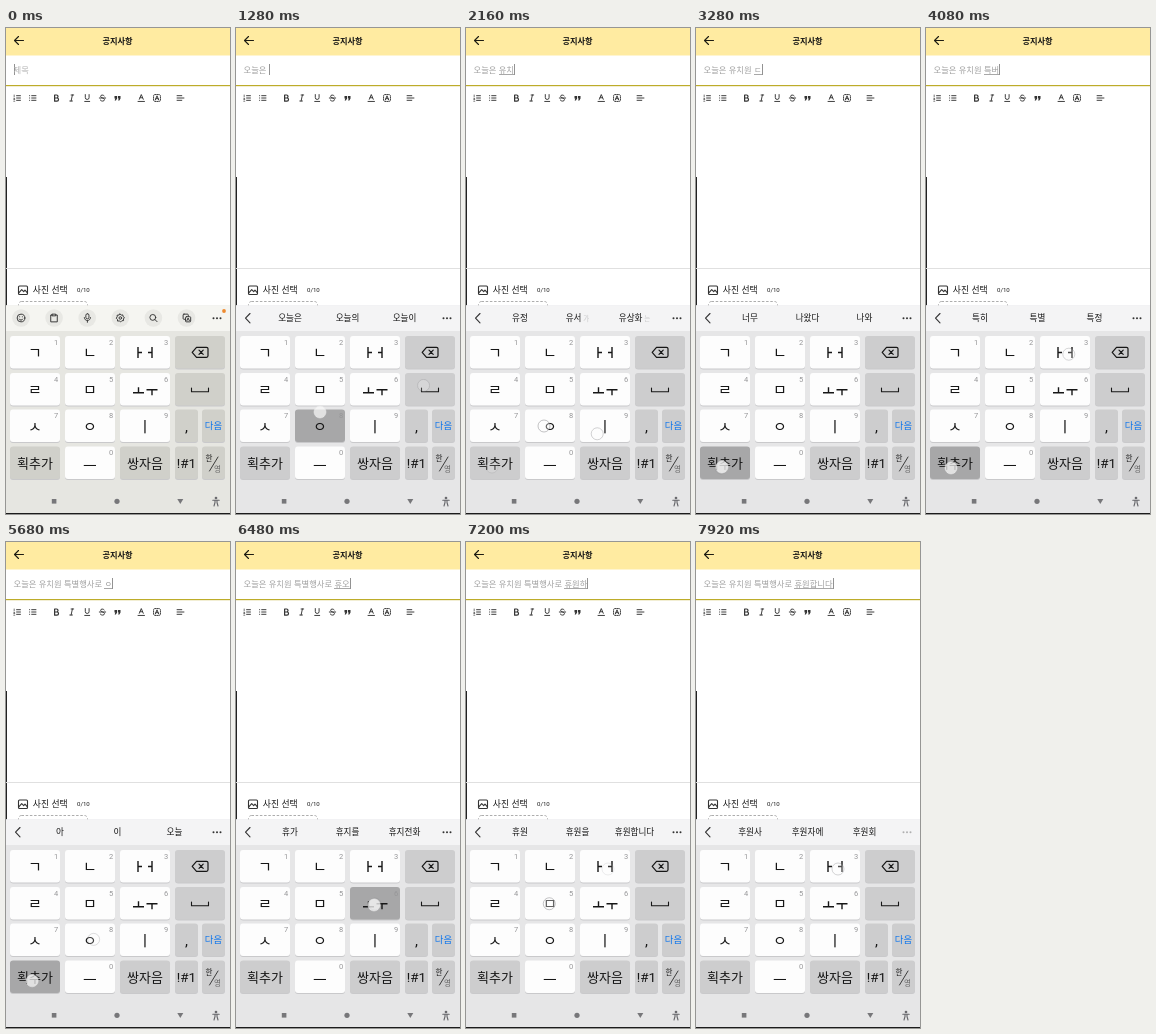
Recreate the animation shown at these times as an HTML page. Size 224 px wide and 486 px high, loop 8000 ms.

```html
<!DOCTYPE html>
<html lang="ko">
<head>
<meta charset="utf-8">
<title>공지사항</title>
<style>
html, body { margin: 0; width: 100%; height: 100%; overflow: hidden; background: #fff; }
body { position: relative; font-family: "Noto Sans CJK KR", "Noto Sans CJK", sans-serif; }
svg { position: absolute; left: 0; top: 0; width: 224px; height: 486px; display: block; --board: #e6e6e7; --gray: #cdcdce; --top: #f4f4f5; }
svg.idle { --board: #e6e6e1; --gray: #d0d0ca; --top: #f5f5f1; }
text { fill: #161616; }
.mid { text-anchor: middle; }
.line { fill: none; stroke: #333; stroke-width: 1.1; stroke-linecap: round; stroke-linejoin: round; }
.icons > * { transform-box: fill-box; transform-origin: center; transform: scale(.86); }
.board { fill: var(--board); }
.top { fill: var(--top); }
.key { fill: #fdfdfd; }
.key.gray { fill: var(--gray); }
.key.down { fill: #a7a7a8; }
.num { fill: #969698; font-family: Roboto, sans-serif; font-size: 7.5px; }
.latin { font-family: Roboto, sans-serif; }
.sug { font-size: 8.6px; font-weight: 500; }
.tail { fill: #c6c6c8; font-size: 6.5px; }
#field { position: absolute; left: 7.5px; top: 34.4px; height: 14px; font-size: 8.3px; line-height: 14px; white-space: pre; color: #a0a0a0; }
#word { display: inline-block; height: 12px; line-height: 14px; vertical-align: top; }
#word.on { border-bottom: 1px solid #a8a8a8; }
#caret { display: inline-block; width: 1px; height: 11px; margin: 2px -1px 0 0; vertical-align: top; background: #929292; }
#hint { color: #b4b4b4; }
</style>
</head>
<body>
<svg id="stage" viewBox="0 0 224 486">
  <rect width="224" height="27.5" fill="#ffeba1"/>
  <path class="line" d="M17.500 12.500H8.500M12.500 8.500l-4 4 4 4" style="stroke:#1c1a12"/>
  <text class="mid" x="111.500" y="15.500" font-size="8.2" font-weight="700">공지사항</text>
  <rect y="57" width="224" height="1.2" fill="#bdac2a"/>

  <g class="line icons">
    <g>
      <path d="M10.5 67.3H15M10.5 70H15M10.5 72.7H15"/>
      <path d="M7.7 66.5v2M7.2 70.3h1.2l-1.2 1.5h1.2M7.2 73.7h1.2" stroke-width=".8"/>
    </g>
    <path d="M23 67.3h.2M23 70h.2M23 72.7h.2M25.5 67.3h5M25.5 70h5M25.5 72.7h5"/>
    <path d="M48.3 66.5h2.2a1.7 1.7 0 0 1 0 3.5h-2.2zM48.3 70h2.7a1.8 1.8 0 0 1 0 3.7h-2.7z" style="stroke-width:1.4"/>
    <path d="M65 66.5h3M63.5 73.5h3M66.5 66.5l-1.5 7"/>
    <path d="M79 66v3.5a2.2 2.2 0 0 0 4.4 0V66M78.3 74h5.8"/>
    <path d="M98.5 67.5c-1-1.5-4.2-1.3-4.2.5 0 2.3 4.5 1.5 4.5 3.9 0 2.2-3.8 2.3-4.9.5M92.8 70h7.4"/>
    <path d="M108 67.5h3v3l-1.3 2.5h-1.5l.8-2.5h-1zM112 67.5h3v3l-1.3 2.5h-1.5l.8-2.5h-1z" style="fill:#333;stroke:none"/>
    <path d="M133 71.5l2.3-5.5 2.3 5.5M133.8 69.7h3M131.5 74h7.5"/>
    <g>
      <path d="M149 72.3l2-4.8 2 4.8M149.8 70.8h2.5"/>
      <rect x="147" y="66" width="8" height="8" rx="1.5" stroke-dasharray="1 1.2"/>
    </g>
    <path d="M170.5 67.3h5.5M170.5 70h8M170.5 72.7h5.5"/>
  </g>

  <rect y="149" width="1" height="128.5" fill="#222"/>
  <rect y="240" width="224" height="1" fill="#e0e0e0"/>
  <g class="line">
    <rect x="12.5" y="258" width="9" height="8.5" rx="1"/>
    <path d="M13 264.7l2.7-3 2 2 1.3-1.5 2.2 2.5"/>
    <rect x="12.5" y="273.5" width="69" height="40" rx="3" style="stroke:#999;stroke-width:.8;stroke-dasharray:2.5 1.7;stroke-linecap:butt"/>
  </g>
  <text x="26.8" y="265" font-size="8.8" font-weight="500">사진 선택</text>
  <text class="latin" x="71" y="264.3" font-size="6.1">0/10</text>

  <rect class="board" y="277.5" width="224" height="208.5"/>
  <rect class="top" y="277.5" width="224" height="25.5"/>

  <g id="tools">
    <g fill="#e8e8e4" id="discs"></g>
    <g class="line icons">
      <g>
        <circle cx="15" cy="290" r="4.5"/>
        <path d="M13 291.3c.7 1.7 3.3 1.7 4 0M13.4 288.6h.1M16.5 288.6h.1"/>
      </g>
      <path d="M46 286.5h-1.8v8h7.6v-8H50M46 285.5h4v2h-4z"/>
      <g>
        <rect x="79.6" y="285" width="3.6" height="6" rx="1.8"/>
        <path d="M77.8 289.5c0 4.7 7.2 4.7 7.2 0M81.4 293v2"/>
      </g>
      <g>
        <path d="M114 285.3l1.3 1.3 1.9-.2.3 1.9 1.6 1.2-1.2 1.6.2 1.9-2 .2-1.4 1.4-1.6-1.2-2 .2-.1-2-1.5-1.4 1.2-1.5-.1-1.9 1.9-.2z"/>
        <circle cx="114.3" cy="290" r="1.5"/>
      </g>
      <g>
        <circle cx="146.7" cy="289.3" r="3.4"/>
        <path d="M149.2 291.8l2.5 2.5"/>
      </g>
      <g>
        <rect x="176.5" y="285.5" width="6" height="6" rx="1"/>
        <rect x="179.3" y="288.5" width="6" height="6" rx="1" fill="#e8e8e4"/>
        <path d="M180.8 293.2l1.5-3.2 1.5 3.2"/>
      </g>
    </g>
    <circle cx="218" cy="283" r="1.9" fill="#ee8a2f"/>
  </g>
  <g id="bar">
    <path class="line" d="M14 285.5l-4.5 4.7 4.5 4.7"/>
    <text class="sug mid" x="54" y="293.3"></text>
    <text class="sug mid" x="111.5" y="293.3"></text>
    <text class="sug mid" x="168.5" y="293.3"></text>
  </g>
  <g id="dots" fill="#333">
    <circle cx="207.5" cy="290.3" r="1"/><circle cx="211" cy="290.3" r="1"/><circle cx="214.5" cy="290.3" r="1"/>
  </g>

  <g id="keys"></g>

  <g class="line" style="stroke:#161616">
    <path d="M132 319v11M132 324.5h4M146 319v11M146 324.5h-4" style="stroke-width:1.4;stroke-linecap:butt"/>
    <path d="M127 364.7h11M132.5 364.7v-5.5M140.5 361.7h11M146 361.7v5.5" style="stroke-width:1.4;stroke-linecap:butt"/>
    <path d="M185.5 360v3.8h17V360"/>
    <path d="M190.5 319.3h10a1.5 1.5 0 0 1 1.5 1.5v7a1.500 1.500 0 0 1-1.500 1.500h-10l-4.300-5zM193 322.200l4.200 4.200M197.200 322.200l-4.200 4.200" style="stroke-width:1.2"/>
    <path d="M203.5 443l8.5-14" style="stroke-width:.8"/>
  </g>
  <text class="mid" x="203" y="432.5" font-size="7.5">한</text>
  <text class="mid" x="211.5" y="443.5" font-size="7.5" style="fill:#666">영</text>
  <g id="rings"></g>

  <g fill="#77777a">
    <rect x="45.8" y="471" width="4.6" height="4.6"/>
    <circle cx="111" cy="473.3" r="2.6"/>
    <path d="M171.3 471h6l-3 5z"/>
  </g>
  <g class="line" style="stroke:#66666a">
    <circle cx="210" cy="470" r=".8"/>
    <path d="M206.8 472.3h6.4M209 472.5v2l-1 3.5M211 472.5v2l1 3.5"/>
  </g>
  <rect y="485" width="224" height="1" fill="#1c1c1c"/>
</svg>
<div id="field"><span id="done"></span><span id="word"></span><span id="caret"></span><span id="hint">제목</span></div>

<script>
const LOOP = 8000, STEP = 80, LAG = 100, HOLD = 80, FADE = 240;
const $ = id => document.getElementById(id);
const NS = 'http://www.w3.org/2000/svg';

function add(parent, tag, attrs, text) {
  const el = document.createElementNS(NS, tag);
  for (const k in attrs) el.setAttribute(k, attrs[k]);
  if (text) el.textContent = text;
  parent.append(el);
  return el;
}

const keys = {};
function key(id, x, y, label, size, opt = {}) {
  const w = opt.w || 50, g = $('keys');
  add(g, 'rect', { x, y: y + 1, width: w, height: 32.5, rx: 3, fill: '#c9c9cb' });
  keys[id] = add(g, 'rect', { x, y, width: w, height: 32.5, rx: 3, class: opt.gray ? 'key gray' : 'key' });
  if (label) {
    const base = y + 16.5 + size * .37 + (opt.drop || 0);
    const t = add(g, 'text', { x: x + w / 2, y: base, 'font-size': size, class: 'mid ' + (opt.font || '') }, label);
    if (opt.color) t.style.fill = opt.color;
  }
  if (opt.num) add(g, 'text', { x: x + w - 4, y: y + 8.5, class: 'num mid' }, opt.num);
}

const cols = [4, 59, 114, 169], rows = [308, 345, 381.5, 418.5];
[...'ㄱㄴㅏㄹㅁㅗㅅㅇㅣ'].forEach((c, i) =>
  key(c, cols[i % 3], rows[i / 3 | 0], 'ㅏㅗ'.includes(c) ? '' : c, 15, { num: i + 1 }));
const gray = { gray: true }, small = { gray: true, w: 23, font: 'latin' };
key('획', 4, rows[3], '획추가', 13, gray);
key('ㅡ', 59, rows[3], 'ㅡ', 15, { num: '0', drop: 2.7 });
key('쌍', 114, rows[3], '쌍자음', 13, gray);
key('<', 169, rows[0], '', 0, gray);
key('_', 169, rows[1], '', 0, gray);
key(',', 169, rows[2], ',', 15, small);
key('다', 196, rows[2], '다음', 9.4, { gray: true, w: 23, color: '#0a74ee' });
key('!', 169, rows[3], '!#1', 13.5, small);
key('한', 196, rows[3], '', 0, small);

for (let i = 0; i < 6; i++) add($('discs'), 'circle', { cx: 15 + 33.1 * i, cy: 290, r: 8.8 });

// Where the thumbs land on each key
const spots = {
  'ㄱ': [30, 327], 'ㄴ': [84, 327], 'ㅏ': [142, 327], 'ㄹ': [32, 361], 'ㅁ': [84, 361], 'ㅗ': [138, 363],
  'ㅅ': [36, 391], 'ㅇ': [87, 398], 'ㅣ': [132, 405], '획': [26, 439], 'ㅡ': [84, 436], '_': [188, 357]
};

// Start time, taps as key + word so far ("_" is space), optional first spot
const runs = [
  [80, 'ㅇㅇ ㅗ오 ㄴ온 ㅡ오느 ㄹ오늘 ㅇ오늘ㅇ ㅡ오늘으 ㄴ오늘은 _'],
  [1230, 'ㅇㅇ ㅗ오 ㅗ우 획유 ㅅ윳 획윶', [84, 384]],
  [1960, '획윷 ㅣ유치'],
  [2070, 'ㅇ유칭 ㅗ유치오 ㅗ유치우 ㅏ유치워 ㄴ유치원 _ ㄴㄴ 획ㄷ', [78, 398]],
  [3240, '획ㅌ ㅡ트 ㄱ특 ㅁ특ㅁ 획특ㅂ ㅏ특바 ㅏ특버 획특벼 ㄹ특별 ㅇ특별ㅇ 획특별ㅎ ㅏ특별하 ㅣ특별해 ㅇ특별행'],
  [4840, 'ㅅ특별행ㅅ ㅏ특별행사 ㄹ특별행살 ㅗ특별행사로 _ ㅇㅇ 획ㅎ ㅗ호 ㅗ후 획휴 ㅇ흉 ㅗ휴오'],
  [6440, 'ㅗ휴우 ㅏ휴워 ㄴ휴원 ㅇ휴원ㅇ 획휴원ㅎ ㅏ휴원하 ㅁ휴원함 획휴원합 ㄴ휴원합ㄴ ㅣ휴원합니 ㄴ휴원합닌 획휴원합닏'],
  [7770, 'ㅏ휴원합니다']
];

const taps = [];
let done = '', word = '';
runs.forEach(([start, list, spot], r) => {
  const items = list.split(' '), end = r + 1 < runs.length ? runs[r + 1][0] : LOOP;
  items.forEach((item, i) => {
    const id = item[0], n = taps.length, [x, y] = spots[id];
    if (id === '_') { done += word + ' '; word = ''; } else word = item.slice(1);
    const wob = i ? Math.sin(n * 2.3) : 0;
    taps.push({ id, done, word, time: start + (end - start) * i / items.length,
      at: !i && spot ? spot : [x + wob, y - wob] });
  });
});

// "|" starts a faded tail
const hints = [
  [240, '오 어 이'], [480, '오늘 오늘도 오늘은'], [1040, '오늘은 오늘의 오늘이'],
  [1520, '우리 오 우리가'], [1840, '유 유정 유지'], [2080, '유정 유서|가 유상화|는'],
  [2240, '유치 유치원 유치한'], [2720, '유치원 유치원에 유치원을'], [3200, '너무 나왔다 나와'],
  [3600, '특히 특별 특정'], [4240, '특별히 특별한 특별'], [4640, '특별한 특별할 특별함'],
  [5120, '특별행사 특별히 특별한'], [5680, '아 이 오늘'], [5920, '하고 한 혹시'], [6240, '휴가 휴지를 휴지전화'],
  [6800, '휴원 휴원을 휴원합니다'], [7360, '후원사 후원자에 후원회']
];
const slots = [...document.querySelectorAll('.sug')];
const rings = Array.from({ length: 5 }, () => add($('rings'), 'circle', { r: 6, 'stroke-width': .8 }));

const last = (list, test) => { for (let i = list.length; i--;) if (test(list[i])) return list[i]; };
let shown = -1;

function draw(t) {
  const typed = last(taps, p => p.time + LAG <= t) || { done: '', word: '' };
  const empty = !typed.done && !typed.word;
  $('done').textContent = typed.done;
  $('word').textContent = typed.word;
  $('word').className = typed.word ? 'on' : '';
  $('hint').style.display = empty ? '' : 'none';

  const hint = last(hints, h => h[0] <= t);
  $('stage').classList.toggle('idle', !hint);
  $('tools').style.display = hint ? 'none' : '';
  $('bar').style.display = hint ? '' : 'none';
  if (hint) hint[1].split(' ').forEach((s, i) => {
    const [main, tail] = s.split('|');
    slots[i].textContent = main;
    if (tail) add(slots[i], 'tspan', { class: 'tail' }, ' ' + tail);
  });
  $('dots').setAttribute('opacity', t >= 7900 ? .35 : 1);

  for (const id in keys) keys[id].classList.remove('down');
  const live = taps.filter(p => t >= p.time && t < p.time + FADE);
  rings.forEach((ring, i) => {
    const p = live[i];
    ring.style.display = p ? '' : 'none';
    if (!p) return;
    const age = t - p.time, down = age < HOLD;
    if (down) keys[p.id].classList.add('down');
    ring.setAttribute('cx', p.at[0]);
    ring.setAttribute('cy', p.at[1]);
    ring.setAttribute('fill', down ? 'rgba(250,250,250,.7)' : 'rgba(255,255,255,.4)');
    ring.setAttribute('stroke', down ? 'rgba(235,235,235,.7)' : 'rgba(120,120,125,.65)');
    ring.setAttribute('opacity', down ? 1 : 1 - (age / FADE) ** 2);
  });
}

const origin = performance.now();
function tick() {
  const t = Math.floor(Math.max(0, performance.now() - origin) % LOOP / STEP) * STEP;
  if (t !== shown) draw(shown = t);
  requestAnimationFrame(tick);
}
tick();
</script>
</body>
</html>
```
